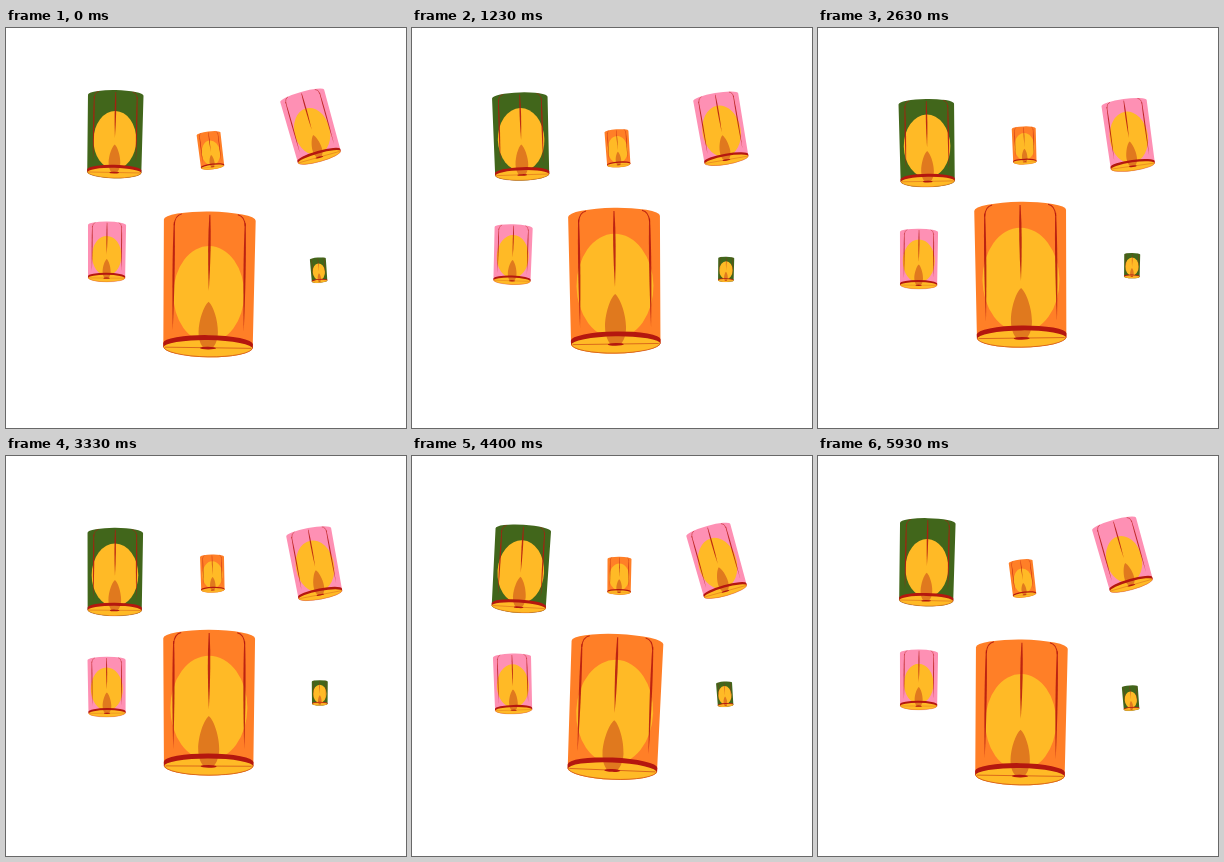
Animation of 400 by 400 pixels, one loop 6.01 s. Source, as an HTML page with a canvas:

```html
<!DOCTYPE html>
<html lang="en">
<head>
<meta charset="utf-8">
<title>Floating lanterns</title>
<style>
html, body { margin: 0; width: 100%; height: 100%; overflow: hidden; background: #fff; }
canvas { display: block; width: 100vmin; height: 100vmin; }
</style>
</head>
<body>
<canvas id="stage" width="400" height="400"></canvas>
<script>
const ctx = document.getElementById('stage').getContext('2d');
const LOOP = 6010, PERIOD = 6000, TAU = Math.PI * 2;
const GREEN = '#41661b', PINK = '#fe90b4', ORANGE = '#ff7f27';
const GLOW = '#ffba26', RED = '#b4170f', FLAME = '#e0791e';

// pivot: distance of the swing point below the lantern's middle
// tilt: degrees at each of the TIMES
const TIMES = [0, 800, 1730, 2630, 3330, 4400];
const lanterns = [
  { color: GREEN, x: 109, y: 110.6, size: 0.605, bob: -5, lag: 15, pivot: 0, tilt: [1.1, -0.6, -2.6, -1.1, 0.4, 3.4] },
  { color: ORANGE, x: 207, y: 119.6, size: 0.261, bob: 2.5, lag: -4, pivot: 20, tilt: [-7, -5.3, -2.7, -2, -1.6, 0.8] },
  { color: PINK, x: 316.4, y: 101.8, size: 0.497, bob: -5, lag: 8, pivot: 43, tilt: [-15.7, -12.5, -7.4, -7.9, -10.5, -15.6] },
  { color: PINK, x: 100.8, y: 227.2, size: 0.415, bob: -3.7, lag: 0, pivot: 0, tilt: [0.5, 1.2, 2.2, 0.5, -0.5, -1.8] },
  { color: GREEN, x: 313.8, y: 239.5, size: 0.174, bob: 2.75, lag: 24, pivot: 14, tilt: [-4.5, -1.5, 3, 1, 0, -4] },
  { color: ORANGE, x: 202.9, y: 250.75, size: 1, bob: 5, lag: 0, pivot: 0, tilt: [0.8, -0.2, -1.2, -0.7, 0.2, 2.3] }
];

// Smooth periodic curve through the given values
function curve(values, t) {
  const n = TIMES.length;
  const timeAt = i => TIMES[(i + n) % n] + Math.floor(i / n) * PERIOD;
  const valueAt = i => values[(i + n) % n];
  const slope = i => (valueAt(i + 1) - valueAt(i - 1)) / (timeAt(i + 1) - timeAt(i - 1));
  let i = n - 1;
  while (TIMES[i] > t) i--;
  const span = timeAt(i + 1) - timeAt(i);
  const u = (t - timeAt(i)) / span, v = 1 - u;
  return valueAt(i) * v * v * (1 + 2 * u) + valueAt(i + 1) * u * u * (3 - 2 * u)
    + span * u * v * (slope(i) * v - slope(i + 1) * u);
}

function oval(x, y, rx, ry, color) {
  ctx.fillStyle = color;
  ctx.beginPath();
  ctx.ellipse(x, y, rx, ry, 0, 0, TAU);
  ctx.fill();
}

function drawBody(color) {
  ctx.fillStyle = color;
  ctx.beginPath();
  ctx.ellipse(0, -63.75, 45.9, 8.5, 0, Math.PI, TAU);
  ctx.lineTo(44.7, 63.5);
  ctx.ellipse(0, 63.5, 44.7, 9.9, 0, 0, Math.PI);
  ctx.closePath();
  ctx.fill();
}

function drawFlame() {
  ctx.fillStyle = FLAME;
  ctx.beginPath();
  ctx.moveTo(0, 14);
  ctx.bezierCurveTo(5, 18, 10.5, 34, 10.5, 47);
  ctx.bezierCurveTo(10.5, 55, 8, 61, 5, 64);
  ctx.lineTo(-5, 64);
  ctx.bezierCurveTo(-8, 61, -10.5, 55, -10.5, 47);
  ctx.bezierCurveTo(-10.5, 34, -5, 18, 0, 14);
  ctx.fill();
}

// Tapered stroke running down the paper
function drawRib(x, top, bottom, width) {
  const mid = top + (bottom - top) * 0.42;
  ctx.beginPath();
  ctx.moveTo(x - 0.5, top);
  ctx.quadraticCurveTo(x - width, mid, x, bottom);
  ctx.quadraticCurveTo(x + width, mid, x + 0.5, top);
  ctx.fill();
}

function drawRibs() {
  ctx.fillStyle = ctx.strokeStyle = RED;
  ctx.globalAlpha = 0.88;
  drawRib(0, -69, 7, 2.2);
  ctx.lineWidth = 1;
  for (const side of [-1, 1]) {
    drawRib(side * 35.5, -61, 47, 1.9);
    ctx.beginPath();
    ctx.moveTo(side * 28, -69.5);
    ctx.quadraticCurveTo(side * 35, -68, side * 35.5, -58);
    ctx.stroke();
  }
  ctx.globalAlpha = 1;
}

function drawRim() {
  ctx.strokeStyle = RED;
  ctx.lineWidth = 0.7;
  ctx.globalAlpha = 0.7;
  ctx.beginPath();
  ctx.ellipse(0, 63.5, 44.4, 9.6, 0, 0, Math.PI);
  ctx.moveTo(-43, 64);
  ctx.lineTo(43, 64);
  ctx.stroke();
  ctx.globalAlpha = 1;
  oval(0, 64.3, 8, 1.4, RED);
  // Band over the front of the opening
  ctx.beginPath();
  ctx.ellipse(0, 60, 44.9, 8.6, 0, Math.PI, TAU);
  ctx.lineTo(44.7, 64.5);
  ctx.ellipse(0, 64.5, 44.7, 8.2, 0, TAU, Math.PI, true);
  ctx.closePath();
  ctx.fill();
}

function drawLantern(l, t, glow) {
  const phase = t / PERIOD * TAU - l.lag * Math.PI / 180;
  ctx.save();
  ctx.translate(l.x, l.y + l.bob * Math.cos(phase) + l.pivot);
  ctx.rotate(curve(l.tilt, t) * Math.PI / 180);
  ctx.translate(0, -l.pivot);
  ctx.scale(l.size, l.size);

  drawBody(l.color);
  const lit = paint => {
    ctx.save();
    ctx.translate(0, 63);
    ctx.scale(glow, glow);
    ctx.translate(0, -63);
    paint();
    ctx.restore();
  };
  lit(() => oval(0, 5.8, 38.5, 52.2, GLOW));
  oval(0, 63.5, 44.7, 9.9, GLOW);
  lit(drawFlame);
  drawRibs();
  drawRim();
  ctx.restore();
}

function draw(ms) {
  // Twenty poses a second
  const now = ms % LOOP;
  const step = Math.min(119, 2 * Math.floor(now / 100) + (now % 100 >= 30 ? 1 : 0));
  const t = step * 50;
  const glow = 1 - 0.08 * Math.pow(Math.cos(Math.PI * t / PERIOD), 20);
  ctx.fillStyle = '#fff';
  ctx.fillRect(0, 0, 400, 400);
  for (const l of lanterns) drawLantern(l, t, glow);
}

const start = performance.now();
function tick() {
  draw(performance.now() - start);
  requestAnimationFrame(tick);
}
tick();
</script>
</body>
</html>
```
